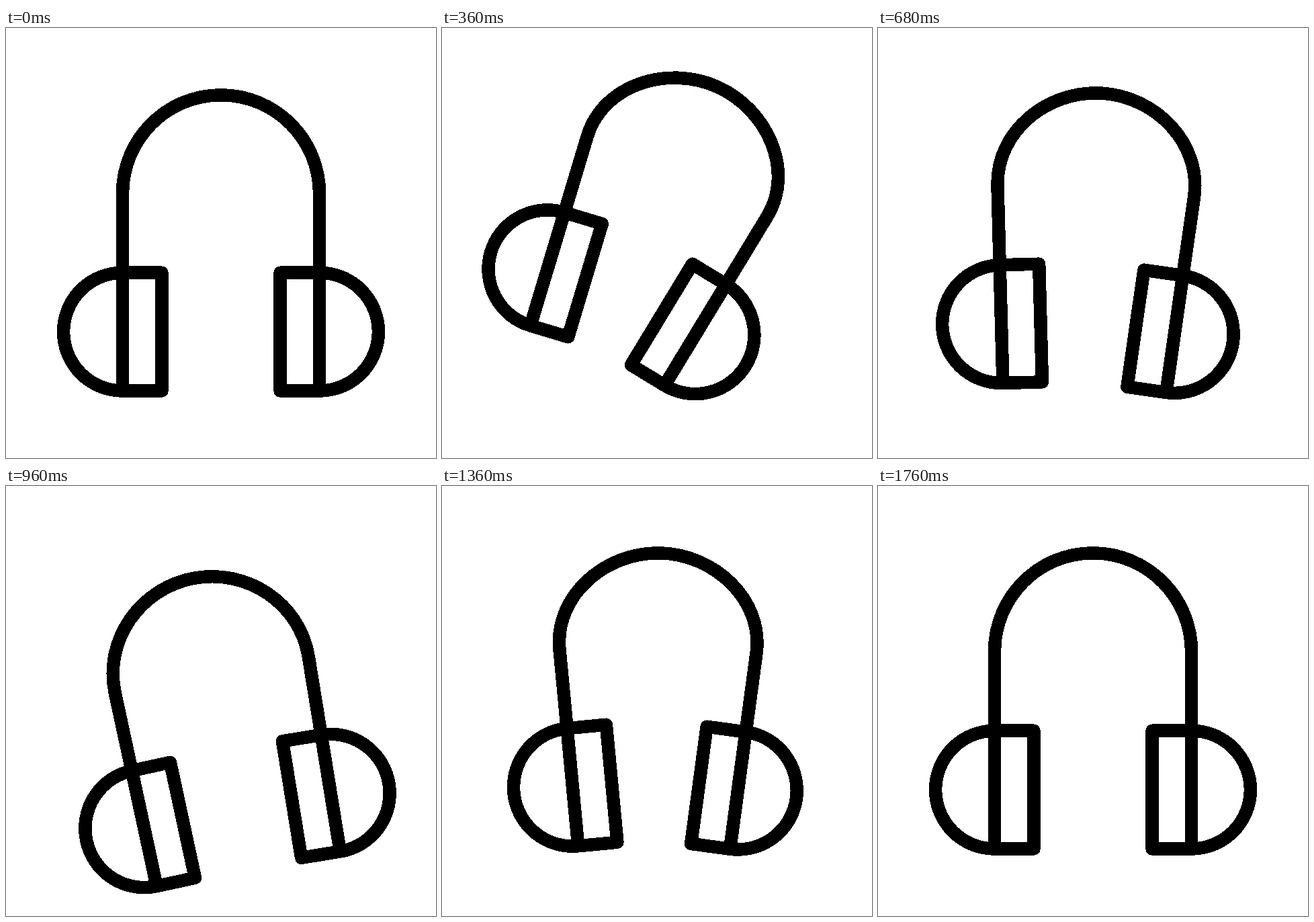
An HTML page for the animation above (2.4 s loop, 640x640 px).

```html
<!DOCTYPE html>
<html lang="en">
<head>
<meta charset="utf-8">
<title>Headphones</title>
<style>
  html, body { margin: 0; width: 100%; height: 100%; overflow: hidden; background: #fff; }
  svg { display: block; width: 100%; height: 100%; shape-rendering: crispEdges; }
  path { fill: none; stroke: #000; stroke-width: 19.5; stroke-linejoin: round; stroke-linecap: round; }
</style>
</head>
<body>
<svg viewBox="0 0 640 640">
  <g id="body">
    <path id="band"/>
    <g id="left"><path d="M173.5 246.3V540M173.5 364.2H232V540H173.5A87.9 87.9 0 0 1 173.5 364.2Z"/></g>
    <g id="right"><path d="M466.5 246.3V540M466.5 364.2H408V540H466.5A87.9 87.9 0 0 0 466.5 364.2Z"/></g>
  </g>
</svg>
<script>
const LOOP = 2400, STEP = 20;
const CX = 320, R = 146.5, ENDS_Y = 246.3, TOP = ENDS_Y - R;
const HANDLE = R * 0.5523;

// Each track is a list of [ms, value]
const tilt = [[0, 0], [460, 27.3], [880, -17.5], [1116, 8], [1540, -3.2], [1760, 0]];
const lift = [[0, 0], [490, -38], [890, 37.5], [1245, 0]];
const squeeze = [[0, 0], [500, 9], [880, 0], [1210, 10], [1590, 0]];

const el = id => document.getElementById(id);
const body = el('body'), band = el('band'), left = el('left'), right = el('right');

function valueAt(track, t) {
  const i = track.findIndex(key => key[0] > t);
  if (i < 0) return track[track.length - 1][1];
  const [t0, a] = track[i - 1], [t1, b] = track[i];
  const u = (t - t0) / (t1 - t0);
  return a + (b - a) * u * u * (3 - 2 * u);
}

// The arms hinge at the band ends; the curve leaves along each arm.
function bandPath(angle) {
  const rad = angle * Math.PI / 180;
  const dx = R + HANDLE * Math.sin(rad), y = ENDS_Y - HANDLE * Math.cos(rad);
  return `M${CX - R} ${ENDS_Y}C${CX - dx} ${y} ${CX - HANDLE} ${TOP} ${CX} ${TOP}` +
    `C${CX + HANDLE} ${TOP} ${CX + dx} ${y} ${CX + R} ${ENDS_Y}`;
}

function draw(t) {
  const s = valueAt(squeeze, t);
  body.setAttribute('transform', `translate(0 ${valueAt(lift, t)}) rotate(${valueAt(tilt, t)} 320 320)`);
  band.setAttribute('d', bandPath(s));
  left.setAttribute('transform', `rotate(${-s} ${CX - R} ${ENDS_Y})`);
  right.setAttribute('transform', `rotate(${s} ${CX + R} ${ENDS_Y})`);
}

const start = performance.now();
function frame() {
  const t = (performance.now() - start) % LOOP;
  draw(Math.floor(t / STEP) * STEP);
  requestAnimationFrame(frame);
}
frame();
</script>
</body>
</html>
```
